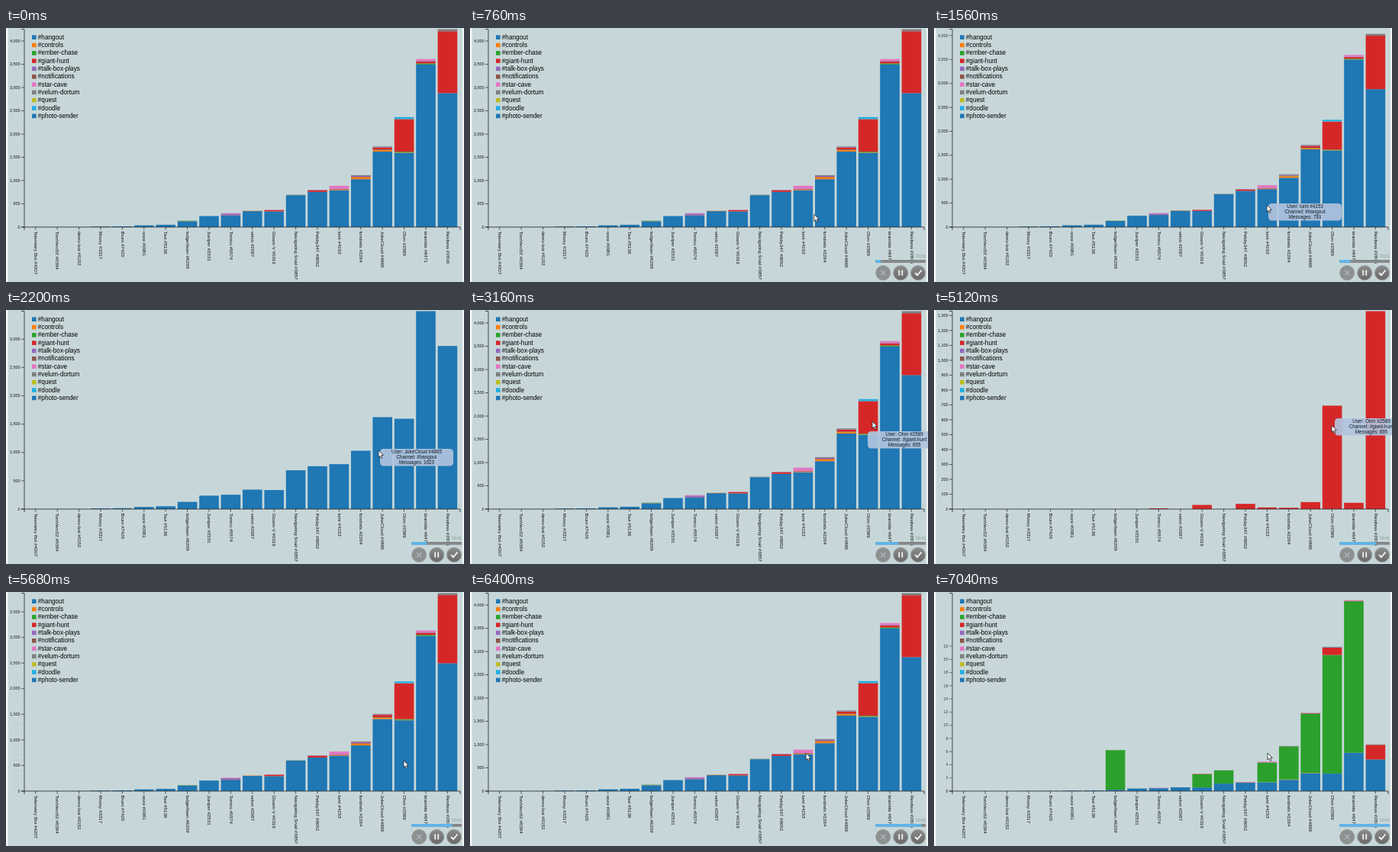
Recreate the animation shown at these times as an HTML page with a canvas. Size 600 by 333 pixels, loop 7.08 s.

```html
<!DOCTYPE html>
<html lang="en">
<head>
<meta charset="utf-8">
<title>Messages per user</title>
<style>
  html, body { margin: 0; width: 100%; height: 100%; overflow: hidden; background: #c7d7d9; }
  canvas { display: block; width: 600px; height: 333px; }
</style>
</head>
<body>
<canvas id="stage"></canvas>
<script>
const W = 600, H = 333, LOOP = 7080, MORPH = 750;
const BASE = 261, PLOT = 259.5, LEFT = 24, RIGHT = 595;
const FIRST = 38.8, STEP = 28.4, BAR = 25.6;
const BG = '#c7d7d9', FONT = '"Liberation Sans", Arial, sans-serif';

const channels = [
  ['talk', '#hangout', '#1f77b4'],
  ['cmd', '#controls', '#ff7f0e'],
  ['ember', '#ember-chase', '#2ca02c'],
  ['hunt', '#giant-hunt', '#d62728'],
  ['box', '#talk-box-plays', '#9467bd'],
  ['note', '#notifications', '#8c564b'],
  ['star', '#star-cave', '#e377c2'],
  ['velum', '#velum-dortum', '#7f7f7f'],
  ['quest', '#quest', '#bcbd22'],
  ['doodle', '#doodle', '#22aee2'],
  ['photo', '#photo-sender', '#1f77b4']
].map(([key, label, color]) => ({ key, label, color }));

const users = [
  ['Telemetry Bot #4207', { talk: 1 }],
  ['TomVero52 #0384', { talk: 1 }],
  ['demo-bot #0152', { talk: 2 }],
  ['Mossy #3317', { talk: 12 }],
  ['Brunt #7420', { talk: 16 }],
  ['ooze #0981', { talk: 38 }],
  ['Tavi #5136', { talk: 50 }],
  ['lodgerfawn #6209', { talk: 127, cmd: 4, ember: 6 }],
  ['Juniper #2531', { talk: 237 }],
  ['Tomiru #5574', { talk: 253, hunt: 5, box: 32, star: 10 }],
  ['velori #2087', { talk: 343, cmd: 8 }],
  ['Gloam-V #0319', { talk: 336, ember: 2, hunt: 28, star: 6 }],
  ['Navigating Snail #3857', { talk: 685, ember: 2, velum: 8 }],
  ['Pebby347 #8052', { talk: 757, hunt: 35, box: 8 }],
  ['lumi #4153', { talk: 793, cmd: 10, ember: 3, hunt: 11, box: 8, star: 65 }],
  ['fondrels #2264', { talk: 1030, cmd: 38, ember: 5, hunt: 9, box: 18, velum: 18 }],
  ['JokeCloud #4865', { talk: 1623, cmd: 30, ember: 9, hunt: 47, box: 10, velum: 14 }],
  ['Ohm #2589', { talk: 1595, cmd: 8, ember: 18, hunt: 695, velum: 10, doodle: 38 }],
  ['bramble #6471', { talk: 3495, ember: 23, hunt: 42, box: 10, star: 42 }],
  ['Restless #2816', { talk: 2880, hunt: 1330, velum: 45 }]
].map(([name, count]) => ({ name, count }));

// Each view keeps one channel, or all of them when key is null.
function makeView(key) {
  const shown = (u, k) => (!key || key === k) ? (u.count[k] || 0) : 0;
  const total = u => channels.reduce((sum, c) => sum + shown(u, c.key), 0);
  const max = Math.max(...users.map(total));
  const scale = PLOT / max;
  return { scale, ticks: ticks(max), height: (u, k) => shown(u, k) * scale };
}

function ticks(max) {
  const power = 10 ** Math.floor(Math.log10(max / 10));
  const rest = max / 10 / power;
  const step = power * (rest >= 7.07 ? 10 : rest >= 3.16 ? 5 : rest >= 1.41 ? 2 : 1);
  const list = [];
  for (let v = 0; v <= max; v += step) list.push(v);
  return list;
}

const all = makeView(null);
const steps = [
  [-MORPH, all],
  [1318, makeView('talk')],
  [2310, all],
  [3956, makeView('hunt')],
  [5100, all],
  [6583, makeView('ember')]
];

const pointer = [
  [120, 535, 312], [950, 438, 234], [1560, 436, 232], [1680, 436, 232],
  [2120, 488, 184], [2400, 488, 184], [3080, 527, 146], [3300, 527, 146],
  [3650, 521, 150], [5080, 521, 150], [5600, 521, 221], [5800, 521, 221],
  [6480, 437, 211], [LOOP, 437, 211]
];

const tips = [
  { from: 950, to: 1800, x: 438, y: 230, user: 14, key: 'talk' },
  { from: 1980, to: 2500, x: 490, y: 182, user: 16, key: 'talk' },
  { from: 2960, to: 3420, x: 521, y: 159, user: 17, key: 'hunt' },
  { from: 3420, to: 5230, x: 525, y: 142, user: 17, key: 'hunt' }
];

const canvas = document.getElementById('stage');
const ctx = canvas.getContext('2d');
const ratio = window.devicePixelRatio || 1;
canvas.width = W * ratio;
canvas.height = H * ratio;

const mix = (a, b, p) => a + (b - a) * p;
const clamp = v => Math.max(0, Math.min(1, v));
const cubic = t => t < 0.5 ? 4 * t ** 3 : 1 - 4 * (1 - t) ** 3;
const smooth = t => t * t * (3 - 2 * t);

function rect(x, y, w, h, color) {
  ctx.fillStyle = color;
  ctx.fillRect(x, y, w, h);
}

function text(str, x, y, size, align = 'left', color = '#111') {
  ctx.font = `${size}px ${FONT}`;
  ctx.textAlign = align;
  ctx.textBaseline = 'middle';
  ctx.fillStyle = color;
  ctx.fillText(str, x, y);
}

function line(points, color, width) {
  ctx.beginPath();
  points.forEach(([x, y], i) => i ? ctx.lineTo(x, y) : ctx.moveTo(x, y));
  ctx.strokeStyle = color;
  ctx.lineWidth = width;
  ctx.stroke();
}

function drawBars(a, b, p) {
  users.forEach((u, i) => {
    let y = BASE;
    const x = FIRST + i * STEP - BAR / 2;
    for (const c of channels) {
      const h = mix(a.height(u, c.key), b.height(u, c.key), p);
      if (!h) continue;
      y -= h;
      rect(x, y, BAR, h, c.color);
    }
  });
}

function drawValueAxis(a, b, p) {
  const values = new Set([...a.ticks, ...b.ticks]);
  for (const v of values) {
    const y = BASE - v * mix(a.scale, b.scale, p);
    if (y < -5) continue;
    const was = a.ticks.includes(v), stays = b.ticks.includes(v);
    ctx.globalAlpha = was && stays ? 1 : stays ? p : 1 - p;
    line([[LEFT - 4, y], [LEFT, y]], '#222', 0.7);
    text(v.toLocaleString('en-US'), LEFT - 5.6, y + 0.2, 5.4, 'right');
  }
  ctx.globalAlpha = 1;
  const top = BASE - PLOT;
  line([[LEFT - 4, top], [LEFT, top], [LEFT, BASE], [LEFT - 4, BASE]], '#222', 0.8);
}

function drawUserAxis() {
  line([[LEFT, BASE + 4], [LEFT, BASE], [RIGHT, BASE], [RIGHT, BASE + 4]], '#222', 0.8);
  users.forEach((u, i) => {
    const x = FIRST + i * STEP;
    line([[x, BASE], [x, BASE + 3.6]], '#222', 0.7);
    ctx.save();
    ctx.translate(x, BASE + 5.4);
    ctx.rotate(Math.PI / 2);
    text(u.name, 0, 0, 6.2);
    ctx.restore();
  });
}

function drawLegend() {
  channels.forEach((c, i) => {
    const y = 12.2 + i * 10.32;
    rect(34, y - 2.8, 5.6, 5.6, c.color);
    text(c.label, 41.8, y + 0.2, 8.2, 'left', '#000');
  });
}

function drawRecorder(t) {
  if (t < 80) return;
  rect(531, 304, 66, 3.8, '#858789');
  rect(531, 304, 66 * clamp(t / 7000), 3.8, '#62b4e8');
  text('00:0' + Math.floor(t / 1000), 597, 300, 5.2, 'right', '#87959a');
  const shade = ctx.createLinearGradient(0, 311, 0, 331);
  shade.addColorStop(0, '#8c8c8c');
  shade.addColorStop(1, '#686868');
  [541.2, 564.2, 587].forEach((x, i) => {
    ctx.beginPath();
    ctx.arc(x, 321, 9.6, 0, 7);
    ctx.fillStyle = i ? shade : '#8c9090';
    ctx.fill();
    ctx.strokeStyle = '#9da2a3';
    ctx.lineWidth = 1;
    ctx.stroke();
  });
  line([[538.2, 318], [544.2, 324]], '#adb3b4', 1.6);
  line([[544.2, 318], [538.2, 324]], '#adb3b4', 1.6);
  line([[562.2, 317.5], [562.2, 324.5]], '#f2f2f2', 1.8);
  line([[566.2, 317.5], [566.2, 324.5]], '#f2f2f2', 1.8);
  line([[583, 321], [586, 324], [591.5, 317.5]], '#f2f2f2', 1.9);
}

function drawTip(t) {
  const tip = tips.find(d => t >= d.from && t < d.to);
  if (!tip) return;
  const u = users[tip.user];
  const channel = channels.find(c => c.key === tip.key);
  ctx.globalAlpha = 0.92;
  ctx.beginPath();
  ctx.roundRect(tip.x, tip.y, 96, 22.6, 4.5);
  ctx.fillStyle = '#b0c4de';
  ctx.fill();
  ctx.globalAlpha = 1;
  ['User: ' + u.name, 'Channel: ' + channel.label, 'Messages: ' + u.count[tip.key]]
    .forEach((s, i) => text(s, tip.x + 48, tip.y + 4.6 + i * 6.9, 6.3, 'center', '#151a22'));
}

function drawPointer(t) {
  const i = pointer.findIndex(k => k[0] > t);
  if (i < 1) return;
  const [t0, x0, y0] = pointer[i - 1], [t1, x1, y1] = pointer[i];
  const p = smooth((t - t0) / (t1 - t0));
  ctx.save();
  ctx.translate(mix(x0, x1, p), mix(y0, y1, p));
  ctx.beginPath();
  [[0, 0], [0, 9], [2, 7.2], [3.5, 10.4], [5, 9.7], [3.6, 6.6], [6.3, 6.4]]
    .forEach(([x, y]) => ctx.lineTo(x, y));
  ctx.closePath();
  ctx.fillStyle = '#fff';
  ctx.fill();
  ctx.strokeStyle = '#222';
  ctx.lineWidth = 0.8;
  ctx.stroke();
  ctx.restore();
}

function draw(t) {
  const n = steps.filter(s => s[0] <= t).length - 1;
  const [start, to] = steps[n];
  const from = n ? steps[n - 1][1] : to;
  const p = cubic(clamp((t - start) / MORPH));

  ctx.setTransform(ratio, 0, 0, ratio, 0, 0);
  rect(0, 0, W, H, '#f3f7f7');
  rect(2.5, 0, 595.5, H, BG);
  drawBars(from, to, p);
  drawValueAxis(from, to, p);
  drawUserAxis();
  drawLegend();
  drawTip(t);
  drawRecorder(t);
  drawPointer(t);
}

const begin = performance.now();
function frame() {
  draw((performance.now() - begin) % LOOP);
  requestAnimationFrame(frame);
}
frame();
</script>
</body>
</html>
```
